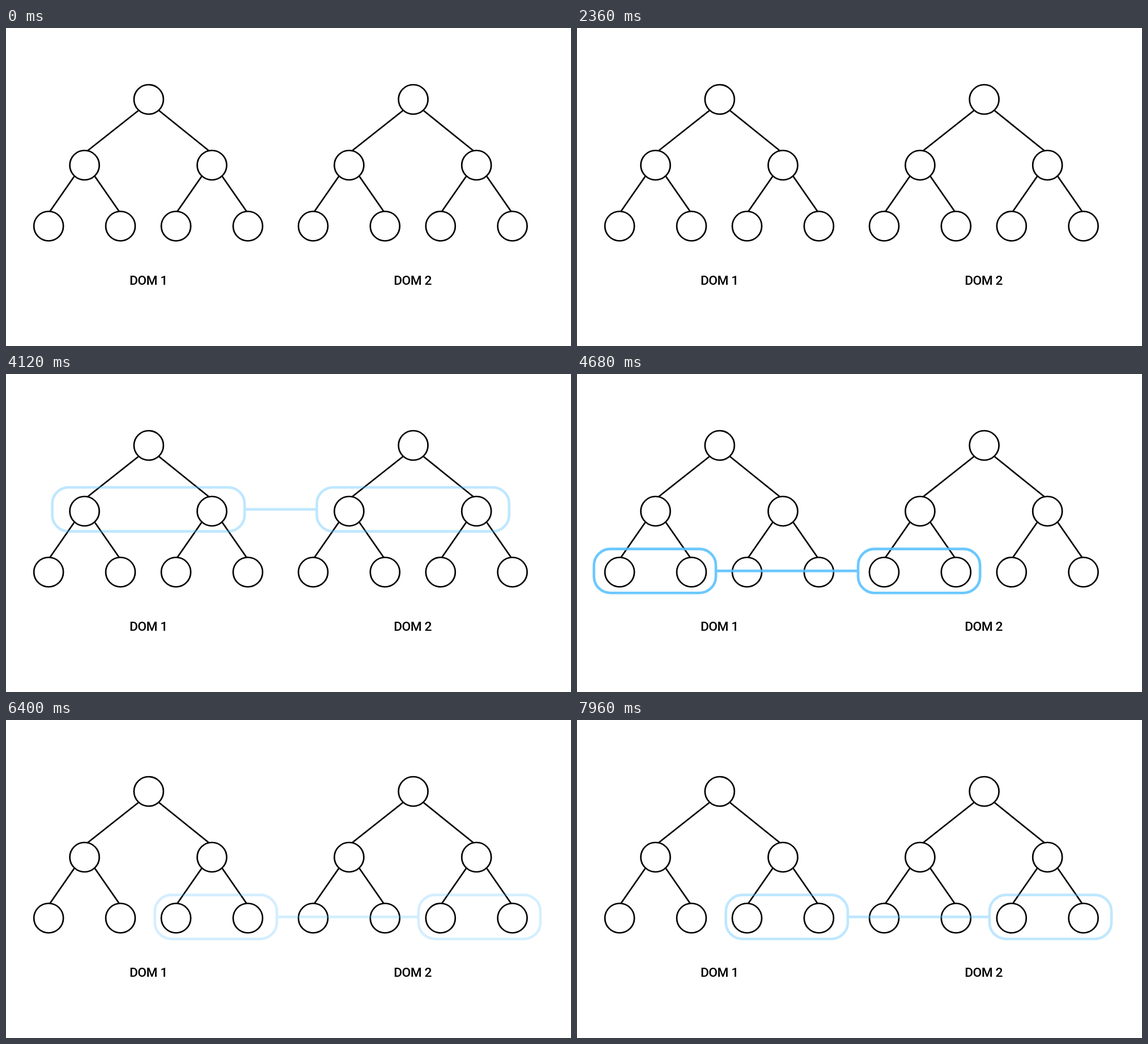
An HTML page for the animation above (8 s loop, 997 px wide and 561 px high).

```html
<!DOCTYPE html>
<html lang="en">
<head>
<meta charset="utf-8">
<title>Comparing two trees level by level</title>
<style>
  html, body { margin: 0; width: 100%; height: 100%; overflow: hidden; background: #fff; }
  svg { display: block; width: 997px; height: 561px; }
  .tree { fill: none; stroke: #000; stroke-width: 2.7; }
  .mark { fill: none; stroke: #54bfff; stroke-width: 4.6; }
  text { font: 500 22.8px Roboto, "Open Sans", sans-serif; letter-spacing: -.5px; text-anchor: middle; }
</style>
</head>
<body>
<svg viewBox="0 0 997 561">
  <g id="tree" class="tree"></g>
  <use href="#tree" x="466.8"/>
  <text x="251.3" y="453">DOM 1</text>
  <text x="717.5" y="453">DOM 2</text>
</svg>
<script>
const LOOP = 8000, STEP = 40, FADE = 480, PERIOD = 1920;
const svg = document.querySelector('svg');
const tree = document.getElementById('tree');

function add(parent, tag, attrs) {
  const el = document.createElementNS('http://www.w3.org/2000/svg', tag);
  for (const name in attrs) el.setAttribute(name, attrs[name]);
  return parent.appendChild(el);
}

// kids: offsets of the children; inset: where an edge meets the child's top
const levels = [
  { y: 126, kids: [-113.2, 111.6], inset: 5.4 },
  { y: 242, kids: [-63.4, 63.4], inset: 2 },
  { y: 349.5, kids: [] }
];

function addNode(x, depth) {
  const { y, kids, inset } = levels[depth];
  add(tree, 'circle', { cx: x, cy: y, r: 26 });
  for (const dx of kids) {
    const side = Math.sign(dx), kid = x + dx;
    add(tree, 'path', { d: `M${x + side * 18} ${y + 19.5}L${kid - side * inset} ${levels[depth + 1].y - 25.5}` });
    addNode(kid, depth + 1);
  }
}
addNode(251.8, 0);

// two boxes centred at x1 and x2, joined by a line
function addMark(x1, x2, y, halfWidth, halfHeight) {
  const group = add(svg, 'g', { class: 'mark' });
  for (const x of [x1, x2])
    add(group, 'rect', {
      x: x - halfWidth, y: y - halfHeight,
      width: 2 * halfWidth, height: 2 * halfHeight, rx: 29
    });
  add(group, 'path', { d: `M${x1 + halfWidth} ${y}H${x2 - halfWidth}` });
  return group;
}

const marks = [
  addMark(251.3, 718, 126.2, 52.5, 37.3),
  addMark(251.3, 718.1, 238.8, 169.7, 38.8),
  addMark(137.5, 603.6, 347.4, 107.6, 38.8),
  addMark(370.3, 835.5, 347.4, 107.6, 38.8)
];

// eased 0 to 1 over one fade
const ease = t => (1 - Math.cos(Math.PI * Math.min(1, Math.max(0, t / FADE)))) / 2;

function draw(now) {
  const time = Math.floor(now % LOOP / STEP) * STEP;
  marks.forEach((mark, i) => {
    const age = time - FADE - i * PERIOD;
    const alpha = ease(age) - ease(age - 3 * FADE);
    const visible = alpha > 0.02 && time >= 600;
    mark.setAttribute('opacity', visible ? alpha : 0);
  });
}

const begin = performance.now();
function tick() {
  draw(performance.now() - begin);
  requestAnimationFrame(tick);
}
tick();
</script>
</body>
</html>
```
